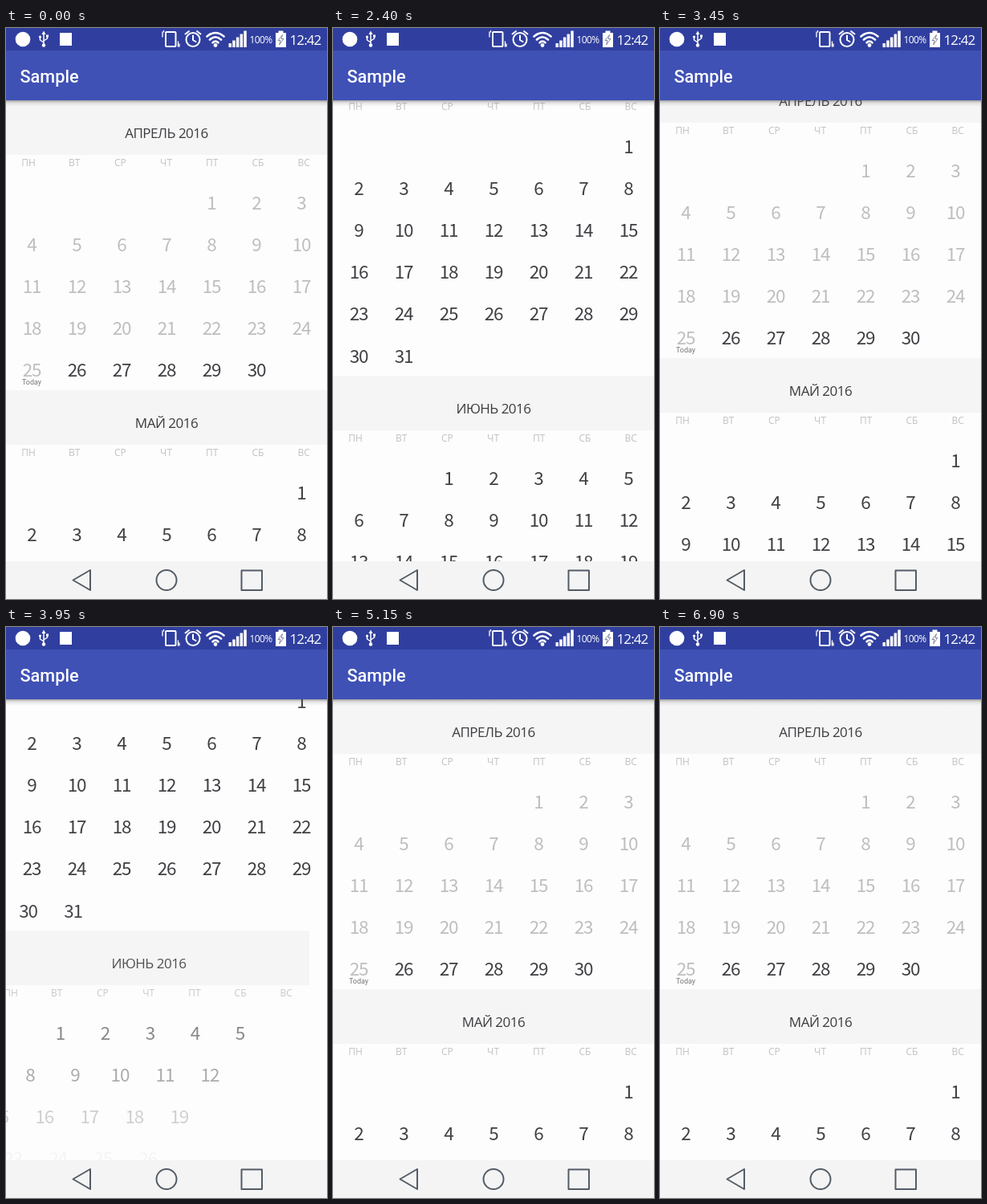
Write an HTML page that moves like this. It is 400 px wide and 711 px high and loops after 7900 ms.

```html
<!DOCTYPE html>
<html lang="ru">
<head>
<meta charset="utf-8">
<title>Sample</title>
<style>
  html, body { margin: 0; width: 100%; height: 100%; overflow: hidden; background: #fdfdfe; }
  svg { display: block; width: 100%; height: 100%; }
  .hand { font-family: "Open Sans", "Noto Sans", sans-serif; }
  #list text { text-anchor: middle; }
  .title { font-size: 17px; letter-spacing: -.5px; fill: #3c3c40; }
  .week { font-size: 12px; fill: #c2c2c2; }
  .day { font: 22.5px "Noto Sans CJK SC", "Noto Sans CJK JP", "Open Sans", sans-serif; letter-spacing: -1.2px; fill: #404044; }
  .past { fill: #bebebe; }
  .today { font: 9px Roboto, sans-serif; fill: #77777a; }
  .status { fill: #fff; }
  .line { fill: none; stroke: #fff; stroke-width: 2; stroke-linecap: round; stroke-linejoin: round; }
  .nav { fill: none; stroke: #535c66; stroke-width: 2; stroke-linejoin: round; }
</style>
</head>
<body>
<svg viewBox="0 0 400 711" preserveAspectRatio="none">
  <defs>
    <linearGradient id="shade" x2="0" y2="1">
      <stop offset="0" stop-color="#444" stop-opacity=".5"/>
      <stop offset=".4" stop-color="#666" stop-opacity=".17"/>
      <stop offset="1" stop-color="#888" stop-opacity="0"/>
    </linearGradient>
  </defs>
  <rect width="400" height="711" fill="#fdfdfe"/>
  <g id="list" class="hand"></g>

  <rect y="90" width="400" height="8" fill="url(#shade)"/>
  <rect y="28" width="400" height="62" fill="#3f51b5"/>
  <text x="17.5" y="67.5" fill="#fff" font-family="Roboto, sans-serif" font-size="21.7" font-weight="500">Sample</text>

  <rect width="400" height="28" fill="#303f9f"/>
  <g class="status">
    <circle cx="21" cy="14" r="9.3"/>
    <path class="line" style="stroke-width:1.5" d="M47 6V21M47 18L42.5 15V11.5M47 16L51.5 13V10"/>
    <path d="M47 3.5L49.5 8H44.5Z"/>
    <circle cx="47" cy="21.5" r="2.2"/>
    <circle cx="42.5" cy="11" r="1.6"/>
    <rect x="50" y="8.5" width="3" height="3"/>
    <rect x="67" y="6" width="15" height="16"/>

    <rect class="line" x="199" y="5" width="12.5" height="18" rx="1"/>
    <path class="line" style="stroke-width:1.3" d="M195 5V11M214.5 17V23M196.5 3.5V5M216 20V23"/>
    <circle class="line" cx="233" cy="14.5" r="8.5"/>
    <path class="line" d="M233 9.5V15L236.5 17M223.500 7.5L228 4M242.5 7.5L238 4"/>
    <g class="line" style="stroke-width:2.6">
      <path d="M250.5 10.5Q261 1.5 271.5 10.5"/>
      <path d="M254 14.5Q261 8 268 14.5"/>
      <path d="M257.5 18.3Q261 15 264.5 18.3"/>
    </g>
    <circle cx="261" cy="21.5" r="2.4"/>
    <path d="M277.5 19h3.5v5h-3.5zM282.2 15.5h3.5v8.5h-3.5zM286.9 11.5h3.5v12.5h-3.5zM291.6 7.5h3.5v16.5h-3.5zM296.3 3.5h3.5v20.5h-3.5z"/>
    <text class="hand" x="303.5" y="18.5" font-size="12" letter-spacing="-.6">100%</text>
    <path d="M339.5 3.5h6v2.500h3.5v18h-13v-18h3.5z"/>
    <path d="M344.5 8.5L339 15.5H342L340.5 21L346 13.5H343Z" fill="none" stroke="#8288a0"/>
    <text class="hand" x="353.5" y="20.5" font-size="17" letter-spacing="-.9">12:42</text>
  </g>

  <rect y="664" width="400" height="47" fill="#f4f4f4"/>
  <g class="nav">
    <path d="M83.5 687.5L105 675V700Z"/>
    <circle cx="200" cy="687.5" r="12.5"/>
    <rect x="293.5" y="675.5" width="25.5" height="24.5"/>
  </g>
</svg>
<script>
const LOOP = 7900, STEP = 50, TOP = 90, BOTTOM = 664;
const HEAD = 100, ROW = 52.2, ENTER = 400, SHIFT = 200;
const WEEK = ["ПН", "ВТ", "СР", "ЧТ", "ПТ", "СБ", "ВС"];
const MONTHS = [
  { name: "АПРЕЛЬ 2016", first: 4, days: 30, today: 25 },
  { name: "МАЙ 2016", first: 6, days: 31, today: 0 },
  { name: "ИЮНЬ 2016", first: 2, days: 30, today: 0 }
];
// [time in ms, scroll in px]
const KEYS = [
  [0, 0], [800, 0], [920, 35], [1025, 97], [1215, 148], [1300, 201], [1400, 361],
  [1500, 405], [1650, 427], [1900, 434], [2350, 434], [2400, 431], [2500, 402], [2650, 290],
  [2780, 185], [2900, 91], [3000, 35], [3150, 0], [3300, 0], [3450, 40], [3586, 148],
  [3634, 201], [3718, 301], [3767, 353], [3818, 405], [3950, 486], [4100, 528],
  [4300, 555], [4450, 560], [4750, 560], [4850, 500], [4950, 300], [5050, 90],
  [5150, 0], [LOOP, 0]
];

const list = document.getElementById("list");
const items = [];

function add(parent, tag, attrs, text) {
  const el = document.createElementNS("http://www.w3.org/2000/svg", tag);
  for (const k in attrs) el.setAttribute(k, attrs[k]);
  if (text !== undefined) el.textContent = text;
  parent.appendChild(el);
  return el;
}

function addItem(y) {
  const item = { y, el: add(list, "g", {}), starts: [] };
  items.push(item);
  return item.el;
}

function buildList() {
  let y = TOP;
  for (const { name, first, days, today } of MONTHS) {
    const head = addItem(y);
    add(head, "rect", { width: 400, height: 68, fill: "#f5f5f5" });
    add(head, "text", { x: 200, y: 47, class: "title" }, name);
    WEEK.forEach((d, i) => add(head, "text", { x: 28 + i * 57.2, y: 81.5, class: "week" }, d));
    y += HEAD;
    for (let start = 1 - first; start <= days; start += 7) {
      const row = addItem(y);
      for (let i = 0; i < 7; i++) {
        const day = start + i, x = 32 + i * 56;
        if (day < 1 || day > days) continue;
        add(row, "text", { x, y: 35.5, class: day <= today ? "day past" : "day" }, day);
        if (day === today) add(row, "text", { x, y: 45.5, class: "today" }, "Today");
      }
      y += ROW;
    }
  }
}

const secant = i => (KEYS[i + 1][1] - KEYS[i][1]) / (KEYS[i + 1][0] - KEYS[i][0]);

function slope(i) {
  if (i === 0 || i === KEYS.length - 1) return 0;
  const a = secant(i - 1), b = secant(i);
  return a * b > 0 ? 2 * a * b / (a + b) : 0;
}

// Monotone cubic through the scroll keys
function scrollAt(t) {
  let i = 0;
  while (i < KEYS.length - 2 && t >= KEYS[i + 1][0]) i++;
  const [t0, a] = KEYS[i], [t1, b] = KEYS[i + 1];
  const d = t1 - t0, u = (t - t0) / d, v = 1 - u;
  return a * v * v * (1 + 2 * u) + b * u * u * (3 - 2 * u)
    + d * u * v * (v * slope(i) - u * slope(i + 1));
}

// Note each time an item comes in over the bottom edge
function findStarts() {
  for (const item of items) item.shown = false;
  for (let t = 0; t < LOOP; t += 4) {
    const edge = scrollAt(t) + BOTTOM;
    for (const item of items) {
      const shown = item.y < edge;
      if (shown && !item.shown) item.starts.push(t || -ENTER);
      item.shown = shown;
    }
  }
}

function entered(item, t) {
  const start = item.starts.filter(s => s <= t).pop();
  if (start === undefined) return 0;
  return (1 - Math.cos(Math.PI * Math.min(1, (t - start) / ENTER))) / 2;
}

function draw(t) {
  const scroll = scrollAt(t);
  for (const item of items) {
    const p = entered(item, t);
    item.el.setAttribute("transform", `translate(${(p - 1) * SHIFT} ${item.y - scroll})`);
    item.el.setAttribute("opacity", p);
  }
}

buildList();
findStarts();
draw(0);
const origin = performance.now();
function tick() {
  const t = (performance.now() - origin) % LOOP;
  draw(Math.floor(t / STEP) * STEP);
  requestAnimationFrame(tick);
}
requestAnimationFrame(tick);
</script>
</body>
</html>
```
